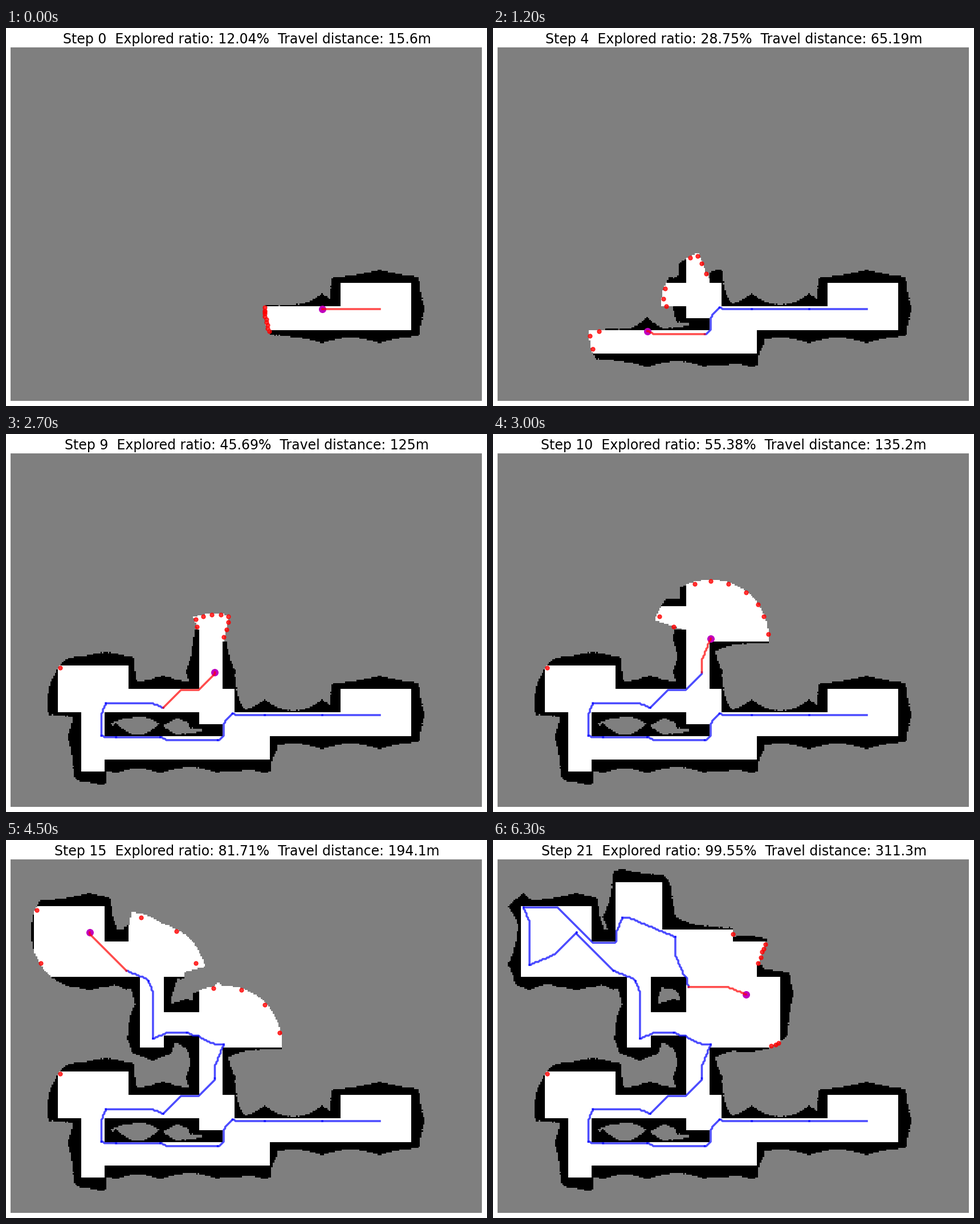
Recreate the animation shown at these times as a matplotlib script. Size 844 px wide and 663 px high, loop 6600 ms.

```python
import numpy as np
import matplotlib.pyplot as plt
from matplotlib.animation import FuncAnimation

WIDTH, HEIGHT, DPI = 844, 663, 85
COLS, ROWS, BLOCK = 320, 240, 8
WALL, UNKNOWN, FREE = 0, 127, 255
SENSOR_RANGE, WALL_DEPTH = 40, 10
METRES_PER_CELL = 0.4
MOVES = [(i, j) for i in (-1, 0, 1) for j in (-1, 0, 1) if (i, j) != (0, 0)]

# Floor plan: free boxes as (left, top, right, bottom), in blocks.
ROOMS = [
    (28, 20, 34, 24), (18, 22, 28, 24), (16, 16, 18, 23), (10, 20, 19, 22),
    (4, 18, 10, 22), (6, 22, 8, 27), (6, 24, 22, 26), (16, 10, 24, 16),
    (11, 13, 16, 15), (11, 10, 13, 16), (8, 7, 22, 10), (10, 2, 14, 7),
    (14, 6, 20, 7), (22, 7, 23, 9), (2, 4, 8, 10),
]

# Cells where the robot stops to scan, the starting point first.
STOPS = [
    (250, 177), (211, 177), (172, 177), (150, 176), (140, 194), (101, 192),
    (71, 192), (61, 191), (64, 169), (103, 172), (138, 148), (144, 125),
    (119, 117), (96, 121), (93, 82), (78, 75), (53, 49), (21, 71), (17, 32),
    (84, 39), (120, 52), (129, 86), (168, 91),
]


def build_map():
    world = np.full((ROWS, COLS), WALL)
    for x0, y0, x1, y1 in ROOMS:
        world[y0 * BLOCK:y1 * BLOCK, x0 * BLOCK:x1 * BLOCK] = FREE
    return world


def cast_ray(world, belief, start, end):
    """Walk a 4-connected line, looking a few cells into the first wall."""
    (x, y), (x1, y1) = start, end
    dx, dy = abs(x1 - x), abs(y1 - y)
    step_x = 1 if x1 > x else -1
    step_y = 1 if y1 > y else -1
    error, hits = dx - dy, 0
    while 0 <= x < COLS and 0 <= y < ROWS:
        cell = world[y, x]
        if cell == WALL:
            hits += 1
            if hits >= WALL_DEPTH:
                return
        elif hits:
            return
        if (x, y) == (x1, y1):
            return
        belief[y, x] = cell
        if error > 0:
            x += step_x
            error -= 2 * dy
        else:
            y += step_y
            error += 2 * dx


def scan(world, belief, pos):
    for angle in np.radians(np.arange(0, 360, 0.5)):
        end = (round(pos[0] + np.cos(angle) * SENSOR_RANGE),
               round(pos[1] + np.sin(angle) * SENSOR_RANGE))
        cast_ray(world, belief, pos, end)


def neighbours(grid, fill):
    """The grid as seen from each of the eight neighbouring directions."""
    padded = np.pad(grid, 1, constant_values=fill)
    for i, j in MOVES:
        yield padded[1 + j:1 + j + ROWS, 1 + i:1 + i + COLS], np.hypot(i, j)


def shortest_path(free, start, goal):
    """Shortest 8-connected path; of equal moves, take the one facing goal."""
    field = np.full(free.shape, np.inf)
    field[goal[1], goal[0]] = 0
    while np.isinf(field[start[1], start[0]]):
        nearest = field
        for shifted, cost in neighbours(field, np.inf):
            nearest = np.minimum(nearest, shifted + cost)
        field = np.where(free, nearest, np.inf)

    path = [start]
    while path[-1] != goal:
        x, y = path[-1]

        def rank(move):
            i, j = move
            cost = np.hypot(i, j)
            facing = (i * (goal[0] - x) + j * (goal[1] - y)) / cost
            return round(field[y + j, x + i] + cost, 6), -facing

        i, j = min(MOVES, key=rank)
        path.append((x + i, y + j))
    return np.array(path)


def frontier_cells(belief):
    unknown = (belief == UNKNOWN).astype(int)
    around = sum(shifted for shifted, _ in neighbours(unknown, 0))
    y, x = np.where((belief == FREE) & (around > 1) & (around < 8))
    return np.column_stack([x, y]).astype(float)


def square_distances(a, b):
    return ((a[:, None] - b[None]) ** 2).sum(-1)


def cluster(cells, count=10, restarts=12, rounds=15):
    """K-means centres, rounded to whole cells."""
    if len(cells) <= count:
        return cells
    rng = np.random.default_rng(1)
    best_cost, best = np.inf, None
    for _ in range(restarts):
        centres = cells[[rng.integers(len(cells))]]
        while len(centres) < count:
            gap = square_distances(cells, centres).min(1)
            pick = rng.choice(len(cells), p=gap / gap.sum())
            centres = np.vstack([centres, cells[pick]])
        for _ in range(rounds):
            label = square_distances(cells, centres).argmin(1)
            centres = np.array([
                cells[label == k].mean(0) if (label == k).any() else centres[k]
                for k in range(count)])
        cost = square_distances(cells, centres).min(1).sum()
        if cost < best_cost:
            best_cost, best = cost, centres
    return np.round(best)


def explore():
    world = build_map()
    free = world == FREE
    belief = np.full_like(world, UNKNOWN)
    scan(world, belief, STOPS[0])
    distance, steps = 0, []
    for start, stop in zip(STOPS, STOPS[1:]):
        path = shortest_path(free, start, stop)
        distance += METRES_PER_CELL * np.hypot(*np.diff(path, axis=0).T).sum()
        scan(world, belief, stop)
        ratio = 100 * (belief == FREE).sum() / free.sum()
        steps.append((belief.copy(), cluster(frontier_cells(belief)), path,
                      ratio, distance))
    return steps


steps = explore()

fig = plt.figure(figsize=(WIDTH / DPI, HEIGHT / DPI), dpi=DPI,
                 facecolor="white")
ax = fig.add_axes([8 / WIDTH, 8.75 / HEIGHT, 827 / WIDTH, 620.25 / HEIGHT])
title = fig.text(422.7 / WIDTH, 1 - 27.2 / HEIGHT, "", fontsize=20.05,
                 ha="center", va="baseline")

# The map starts on a whole pixel, a fraction of a cell before the lines.
EXTENT = (-0.7, COLS - 0.7, ROWS - 0.6, -0.6)


def draw(step):
    belief, frontiers, _, ratio, distance = steps[step]
    ax.clear()
    ax.axis("off")
    ax.imshow(belief, cmap="gray", vmin=WALL, vmax=FREE, aspect="auto",
              interpolation="nearest", extent=EXTENT)
    ax.plot(*frontiers.T, "ro", markersize=6, alpha=0.8)
    ax.scatter(*STOPS[step + 1], c="m", s=100, zorder=2)
    for i, (_, _, path, _, _) in enumerate(steps[:step + 1]):
        ax.plot(*path.T, color="r" if i == step else "b", linewidth=3,
                alpha=0.7)
    ax.set_xlim(EXTENT[:2])
    ax.set_ylim(EXTENT[2:])
    title.set_text(f"Step {step}  Explored ratio: {ratio:.4g}%  "
                   f"Travel distance: {distance:.4g}m")


anim = FuncAnimation(fig, draw, frames=len(steps), interval=300, repeat=True)
plt.show()
```
